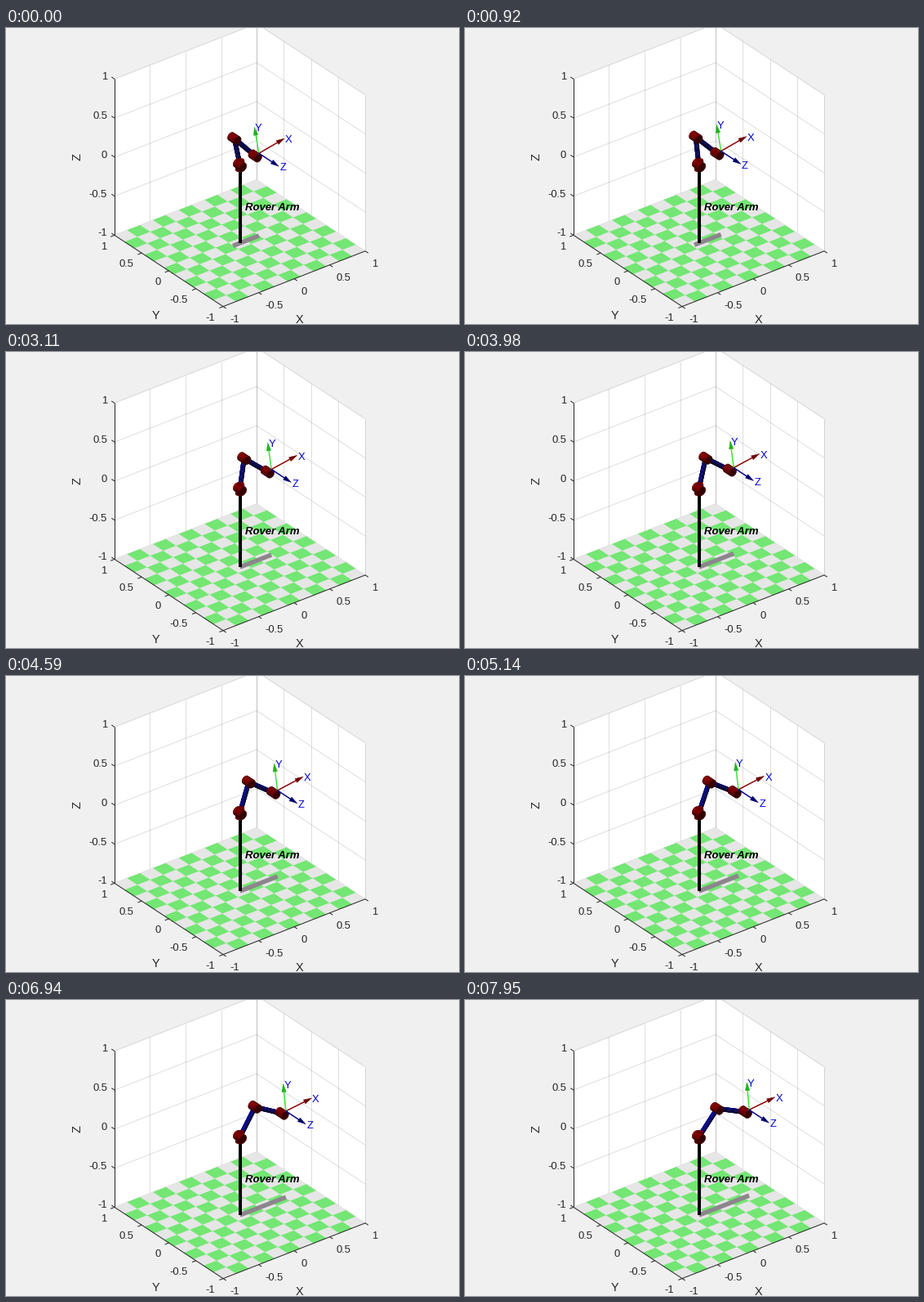
Animation of 555x362 px, one loop 8 s. Source, as a matplotlib script:

```python
import numpy as np
import matplotlib.pyplot as plt
from matplotlib.animation import FuncAnimation
from matplotlib.collections import LineCollection, PolyCollection

W, H, DPI = 555, 362, 100
LOOP, STEP = 8000, 50
PX = 72 / DPI
INK = "#262626"

plt.rcParams["font.family"] = "Liberation Sans"
fig = plt.figure(figsize=(W / DPI, H / DPI), dpi=DPI, facecolor="#f0f0f0")
ax = fig.add_axes([0, 0, 1, 1])
ax.set_xlim(0, W)
ax.set_ylim(H, 0)
ax.axis("off")

# orthographic camera: azimuth -37.5, elevation 30 degrees
VIEW = np.array([-0.527, -0.687, 0.5])
LIGHT = np.array([-0.45, -0.15, 0.88])
BASIS = np.array([[87.05, -33.9], [-66.55, -43.6], [0, -95.5]])
CENTER = np.array([286.55, 167.6])


def project(p):
    return CENTER + np.asarray(p, float) @ BASIS


def text(x, y, s, size=13, ha="center", **kw):
    kw.setdefault("color", INK)
    return ax.text(x, y + 0.36 * size, s, fontsize=size * PX, ha=ha,
                   va="baseline", **kw)


def lines(segments, color, width, z):
    ax.add_collection(LineCollection([project(s) for s in segments],
                                     colors=color, linewidths=width * PX, zorder=z))


# ---- static scene ----
ticks = np.linspace(-1, 1, 5)
walls = [[(-1, 1, -1), (-1, 1, 1), (1, 1, 1), (1, 1, -1)],
         [(1, 1, -1), (1, 1, 1), (1, -1, 1), (1, -1, -1)]]
ax.add_collection(PolyCollection([project(w) for w in walls],
                                 facecolors="white", zorder=0))

grid = []
for v in ticks:
    grid += [[(v, 1, -1), (v, 1, 1)], [(1, v, -1), (1, v, 1)],
             [(-1, 1, v), (1, 1, v)], [(1, 1, v), (1, -1, v)]]
lines(grid, (0.15, 0.15, 0.15, 0.15), 1, 1)

N = 11
edge = np.linspace(-1, 1, N + 1)
tiles, tints = [], []
for i in range(N):
    for j in range(N):
        x0, x1, y0, y1 = edge[i], edge[i + 1], edge[j], edge[j + 1]
        tiles.append(project([(x0, y0, -1), (x1, y0, -1), (x1, y1, -1), (x0, y1, -1)]))
        tints.append("#73e673" if (i + j) % 2 else "#e6e6e6")
ax.add_collection(PolyCollection(tiles, facecolors=tints, edgecolors="face",
                                 linewidths=0.2, zorder=2))

frame = [[(-1, 1, -1), (-1, 1, 1)], [(-1, 1, -1), (-1, -1, -1)],
         [(-1, -1, -1), (1, -1, -1)]]
T = 0.055
for v in ticks:
    frame += [[(-1, 1, v), (-1, 1 + T, v)], [(-1, v, -1), (-1 - T, v, -1)],
              [(v, -1, -1), (v, -1 - T, -1)]]
lines(frame, INK, 1, 3)

for v in ticks:
    label = f"{v:g}"
    x, y = project((-1, 1, v))
    text(x - 9, y - 3.6, label, ha="right")
    x, y = project((-1, v, -1))
    text(x - 10, y + 12.6, label, ha="right")
    x, y = project((v, -1, -1))
    text(x + 8, y + 14.4, label, ha="left")

text(359, 355.3, "X", 14.5)
text(184, 351, "Y", 14.5)
ax.text(87.6, 158, "Z", fontsize=14.5 * PX, color=INK, rotation=90,
        ha="center", va="center")
text(293, 218, "Rover Arm", 13.1, ha="left", color="black",
     weight="bold", style="italic", zorder=20)

# ---- moving parts ----
SHADOW_Z, POST_Z, ARM_Z, AXES_Z = 4, 5, 6, 7
shadow, = ax.plot([], [], color="#8c868c", lw=5.5 * PX,
                  solid_capstyle="butt", zorder=SHADOW_Z)
post = project([(0, 0, -1), (0, 0, 0)])
ax.plot(*post.T, color="black", lw=4 * PX, solid_capstyle="butt", zorder=POST_Z)
arm = PolyCollection([], linewidths=0.3, zorder=ARM_Z)
ax.add_collection(arm)

AXIS_COLORS = ["#8b0000", "#3ce63c", "#00008b"]
HEAD_COLORS = ["#6e0000", "#1eb41e", "#00006e"]
shafts = [ax.plot([], [], color=c, lw=1.5 * PX, zorder=AXES_Z)[0] for c in AXIS_COLORS]
heads = PolyCollection([], facecolors=HEAD_COLORS, edgecolors=HEAD_COLORS,
                       linewidths=0.3, zorder=AXES_Z)
ax.add_collection(heads)
names = [text(0, 0, s, color="#0000d2", zorder=AXES_Z + 1) for s in "XYZ"]

RED, BLUE = np.array([0.5, 0, 0]), np.array([0, 0, 0.6])
SIDES = 16
RING = np.linspace(0, 2 * np.pi, SIDES, endpoint=False)


def cylinder(a, b, r, color):
    """Visible faces of a lit cylinder from a to b."""
    a, b = np.asarray(a, float), np.asarray(b, float)
    axis = (b - a) / np.linalg.norm(b - a)
    helper = np.array([0, 1, 0]) if abs(axis[1]) < 0.9 else np.array([0, 0, 1])
    u = np.cross(axis, helper)
    u /= np.linalg.norm(u)
    v = np.cross(axis, u)
    normals = np.outer(np.cos(RING), u) + np.outer(np.sin(RING), v)
    lo, hi = a + r * normals, b + r * normals

    faces = []
    for k in range(SIDES):
        m = (k + 1) % SIDES
        n = normals[k] + normals[m]
        faces.append((n / np.linalg.norm(n), [lo[k], lo[m], hi[m], hi[k]]))
    faces += [(axis, hi), (-axis, lo)]

    out = []
    for n, pts in faces:
        if n @ VIEW > 0:
            shade = 0.3 + 0.7 * max(0, n @ LIGHT)
            out.append((project(pts), tuple(color * shade)))
    return out


def joint(p, axis):
    d = 0.06 * np.array(axis)
    return cylinder(p - d, p + d, 0.05, RED)


def polar(length, degrees):
    q = np.radians(degrees)
    return np.array([length * np.cos(q), 0, length * np.sin(q)])


def arrow_head(a, b):
    d = (b - a) / np.linalg.norm(b - a)
    side = np.array([-d[1], d[0]]) * 2.7
    root = b - 10 * d
    return [b, root + side, root - side]


# the picture advances in uneven steps: (first, last, count) in ms
RUNS = [(140, 1090, 7), (1240, 2170, 6), (2340, 3340, 8), (3510, 4530, 7),
        (4590, 5610, 8), (5690, 6710, 8), (6940, 7950, 8)]
TIMES = np.concatenate([[0]] + [np.linspace(*run) for run in RUNS])


def update(i):
    now = i * STEP
    t = TIMES[TIMES <= now + 1][-1] / 1000

    base = np.zeros(3)
    elbow = polar(0.375, 102 - 6.93 * t)
    wrist = elbow + polar(0.438, -48.2 + 1.9 * t + 0.125 * t * t)
    pitch = 10 - 0.6 * t
    tip = wrist + polar(0.056, pitch + 5)

    parts = (cylinder(base, elbow, 0.025, BLUE) + cylinder(elbow, wrist, 0.025, BLUE)
             + joint(base, (0, 0, 1)) + joint(base, (0, 1, 0))
             + joint(elbow, (0, 1, 0)) + joint(wrist, (0, 1, 0)))
    tones = [c for _, c in parts]
    arm.set_verts([p for p, _ in parts])
    arm.set_facecolor(tones)
    arm.set_edgecolor(tones)

    xs = [0, elbow[0] - 0.02, tip[0]]
    shadow.set_data(*project([(min(xs), 0, -1), (max(xs), 0, -1)]).T)

    size = 0.365
    origin = project(tip)
    ends = [project(tip + d) for d in (polar(size, pitch), polar(size, pitch + 90),
                                       np.array([0, -size, 0]))]
    for shaft, end, name in zip(shafts, ends, names):
        shaft.set_data(*np.array([origin, origin + 0.8 * (end - origin)]).T)
        name.set_position((end[0] + 5, end[1] + 0.5 + 0.36 * 13))
    heads.set_verts([arrow_head(origin, e) for e in ends])
    return [arm, shadow, heads, *shafts, *names]


anim = FuncAnimation(fig, update, frames=LOOP // STEP, interval=STEP,
                     repeat=True, repeat_delay=0, blit=False)
plt.show()
```
